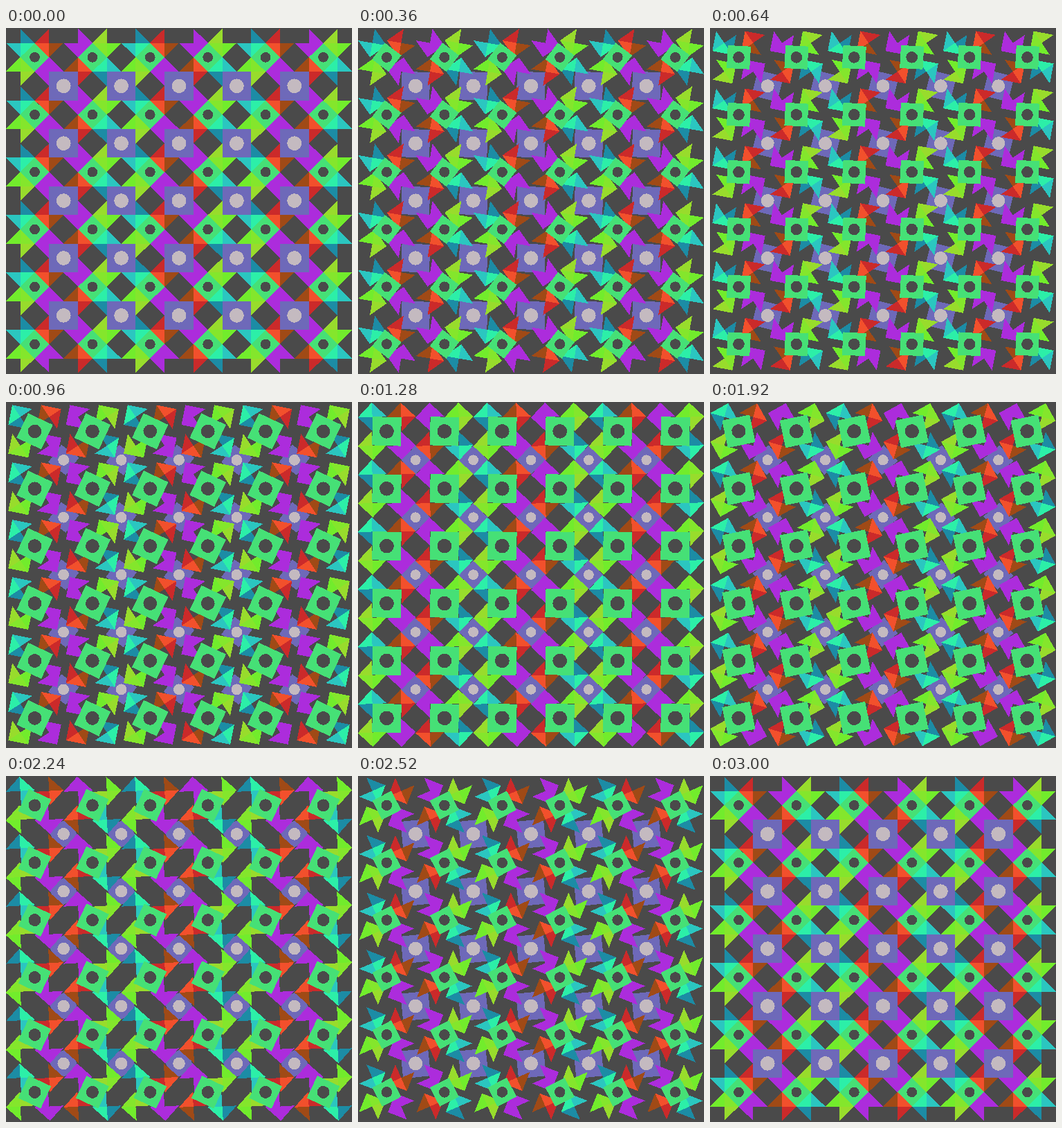
An HTML page that plays this animation: 500x500 px, repeating every 3.04 s.

```html
<!DOCTYPE html>
<html lang="en">
<head>
<meta charset="utf-8">
<title>Turning squares</title>
<style>
  html, body { margin: 0; width: 100%; height: 100%; overflow: hidden; background: #4a4a4a; }
  svg { display: block; width: 100vw; height: 100vh; }
</style>
</head>
<body>
<svg viewBox="0 0 500 500" shape-rendering="crispEdges">
  <g id="board" transform="translate(250 249.6) scale(41.7 41.45)"></g>
</svg>
<script>
const NS = 'http://www.w3.org/2000/svg';
const board = document.getElementById('board');
const SIZE = 6, STEP = 40, STEPS = 76;
const BACK = '#4a4a4a';

// Blades of each corner square, clockwise from its open quarter.
const CYAN = ['#1c8ca5', '#2cefa8', '#2bc6c0'];
const RED = ['#a04a16', '#f2502c', '#cb2a2a'];
const LIME = ['#72ec2c', '#84e62c', '#98dc2c'];
const PURPLE = ['#ac2cdc', '#ac2cdc', '#ac2cdc'];

function add(parent, tag, attrs) {
  const node = document.createElementNS(NS, tag);
  for (const key in attrs) node.setAttribute(key, attrs[key]);
  return parent.appendChild(node);
}

// Each spinner is placed once; its inner group gets the moving transform.
function spinner(x, y) {
  return add(add(board, 'g', { transform: `translate(${x} ${y})` }), 'g', {});
}

function plate(x, y, fill, dot) {
  const g = spinner(x, y);
  add(g, 'rect', { x: -0.5, y: -0.5, width: 1, height: 1, fill });
  add(g, 'circle', { r: 0.25, fill: dot });
  return g;
}

// A diamond with three blades; at angle 0 the open quarter faces up-left.
function blades(x, y, colors) {
  const g = spinner(x, y);
  const points = ['0,-.5', '.5,0', '0,.5', '-.5,0'];
  colors.forEach((fill, i) =>
    add(g, 'polygon', { points: `0,0 ${points[i]} ${points[i + 1]}`, fill }));
  return g;
}

function eachCell(count, draw) {
  for (let row = 0; row < count; row++)
    for (let col = 0; col < count; col++)
      draw(2 * col - count + 1, 2 * row - count + 1, col);
}

const blues = [], greens = [], corners = [];

eachCell(SIZE - 1, (x, y) => blues.push(plate(x, y, '#6e69b9', '#c4bac0')));

eachCell(SIZE, (x, y, col) => {
  // Clockwise from top left; odd columns are turned by half.
  const colors = [CYAN, RED, PURPLE, LIME];
  [[-1, -1], [1, -1], [1, 1], [-1, 1]].forEach(([dx, dy], i) => {
    const set = colors[(i + col % 2 * 2) % 4];
    corners.push({ node: blades(x + dx / 2, y + dy / 2, set), base: i * 90 });
  });
});

eachCell(SIZE, (x, y) => greens.push(plate(x, y, '#46e076', BACK)));

const ease = p => p < 0.5 ? 4 * p ** 3 : 1 - 4 * (1 - p) ** 3;

function render(ms) {
  const phase = 2 * (Math.floor(ms / STEP) % STEPS) / (STEPS - 1);
  const half = phase < 1 ? 0 : 1;
  const eased = ease(phase - half);
  const turn = 180 * (half + eased);
  const grow = half ? 1 - eased : eased;
  const scale = k => Math.SQRT1_2 + (1 - Math.SQRT1_2) * k;
  const pose = (node, angle, size) =>
    node.setAttribute('transform', `rotate(${angle}) scale(${size})`);

  for (const g of blues) pose(g, turn / 4, scale(1 - grow));
  for (const c of corners) pose(c.node, c.base + turn, 1);
  for (const g of greens) pose(g, 45 - turn * 0.75, scale(grow));
}

const start = performance.now();
function tick() {
  render(performance.now() - start);
  requestAnimationFrame(tick);
}
tick();
</script>
</body>
</html>
```
